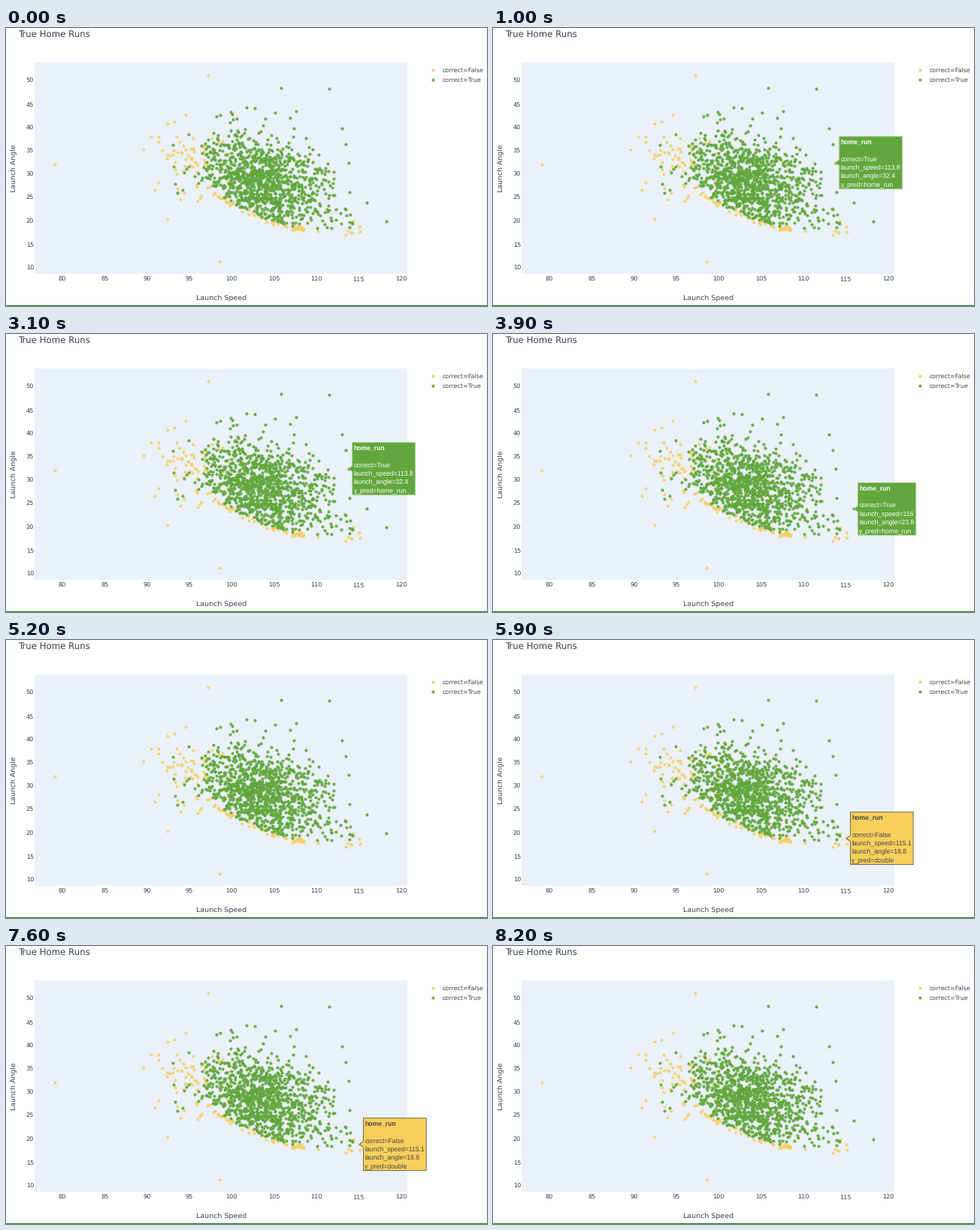
Animation of 640x371 px, one loop 8300 ms. Source, as a matplotlib script:

```python
import numpy as np
import matplotlib.pyplot as plt
from matplotlib.animation import FuncAnimation
from matplotlib.patches import Polygon, Rectangle

W, H, DPI = 640, 371, 100
STEP, FRAMES = 100, 83
GREEN, YELLOW = "#62a73d", "#f5d06b"
INK = "#38404c"

plt.rcParams["text.hinting"] = "no_hinting"

# Isolated points as (speed, angle)
GREEN_KEYS = [(105.8, 48.4), (111.5, 48.3), (113, 39.8), (113.5, 36.3),
              (113.8, 32.4), (116, 23.8), (118.3, 19.8), (101.8, 44.2)]
YELLOW_KEYS = [(79.1, 32), (97.2, 51.2), (89.6, 35.2), (98.6, 11.2),
               (94.6, 42.7), (92.4, 20.3), (90.9, 26.6), (115.1, 18.8)]


def to_px(points):
    """Map (speed, angle) pairs to stage pixels."""
    speed, angle = np.array(points, float).T
    return np.column_stack([75 + (speed - 80) * 11.26, 70 + (50 - angle) * 6.24])


def lower_edge(x):
    return 268 - 68 * ((440 - x) / 185) ** 2.4


def upper_edge(x):
    return 126 + 72 * (np.abs(x - 335) / 105) ** 3


def box(rng, count, left, right, top, bottom):
    return rng.uniform((left, top), (right, bottom), (count, 2))


def green_cloud(rng, count=1060):
    x = rng.normal(339, 45, 6000)
    y = rng.normal(207 + 0.27 * (x - 339), 31)
    keep = (x > 258) & (x < 439) & (y < lower_edge(x)) & (y > upper_edge(x))
    core = np.column_stack([x, y])[keep][:count]
    top = box(rng, 12, 278, 396, 105, 131)
    left = box(rng, 12, 221, 260, 142, 222)
    right = box(rng, 14, 428, 467, 212, 268)
    return np.vstack([core, top, left, right])


def yellow_cloud(rng):
    x = rng.uniform(268, 400, 50)
    rim = np.column_stack([x, lower_edge(x) + rng.normal(1, 2.5, x.size)])
    clump = rng.normal((392, 267), (5, 1.6), (12, 2))
    left = rng.normal((240, 168), (22, 18), (46, 2))
    low = box(rng, 8, 214, 265, 205, 235)
    inner = box(rng, 14, 262, 300, 145, 225)
    right = box(rng, 7, 410, 472, 257, 276)
    return np.vstack([rim, clump, left, low, inner, right])


fig = plt.figure(figsize=(W / DPI, H / DPI), dpi=DPI, facecolor="white")
ax = fig.add_axes([0, 0, 1, 1])
ax.set_xlim(0, W)
ax.set_ylim(H, 0)
ax.axis("off")


def label(x, y, text, size, color=INK, font="DejaVu Sans", **kw):
    return ax.text(x, y, text, fontsize=size * 72 / DPI, color=color,
                   family=font, va="baseline", **kw)


def dots(points, color, z):
    x, y = np.array(points).T
    ax.scatter(x, y, s=9, color=color, alpha=0.93, linewidths=0,
               zorder=z, snap=False)


def draw_chart():
    ax.add_patch(Rectangle((38, 46), 496, 282, color="#ebf1fb", lw=0))
    for x, speed in zip(to_px([(v, 0) for v in range(80, 121, 5)])[:, 0],
                        range(80, 121, 5)):
        label(x, 337.5, str(speed), 8.2, ha="center")
    for y, angle in zip(to_px([(0, v) for v in range(10, 51, 5)])[:, 1],
                        range(10, 51, 5)):
        label(37, y + 3.2, str(angle), 8.2, ha="right")

    label(16.5, 12, "True Home Runs", 11.7)
    label(286.3, 363.2, "Launch Speed", 9.5, ha="center")
    label(12.7, 187.3, "Launch Angle", 9.4, ha="center", rotation=90,
          rotation_mode="anchor")

    rng = np.random.default_rng(12)
    dots(np.vstack([to_px(YELLOW_KEYS), yellow_cloud(rng)]), YELLOW, 3)
    dots(np.vstack([to_px(GREEN_KEYS), green_cloud(rng)]), GREEN, 4)

    for y, color, name in [(56, YELLOW, "False"), (68.8, GREEN, "True")]:
        dots([(567.5, y)], color, 4)
        label(581, y + 3.1, "correct=" + name, 7.98)
    ax.add_patch(Rectangle((0, 370), W, 1, color="#128012", lw=0))


def tooltip(correct, speed, angle, pred):
    """Hover box to the right of a point; returns its artists."""
    fill, ink, edge = ((GREEN, "white", "#a3cb8c") if correct
                       else ("#f8cf5c", "#444444", "#55503c"))
    x, y = to_px([(speed, angle)])[0]
    left, top, bottom = x + 5.2, y - 35, y + 35
    lines = ["home_run", "", f"correct={correct}", f"launch_speed={speed}",
             f"launch_angle={angle}", f"y_pred={pred}"]
    texts = [label(left + 1.9, top + 10 + 11.45 * i, line, 8.7, ink,
                   "Liberation Sans", zorder=7,
                   weight="normal" if i else "bold")
             for i, line in enumerate(lines)]
    right = left + 4 + max(t.get_window_extent().width for t in texts)
    shape = [(x, y), (left, y - 4), (left, top), (right, top),
             (right, bottom), (left, bottom), (left, y + 4)]
    bubble = Polygon(shape, facecolor=fill, edgecolor=edge, lw=0.6, zorder=6)
    return [ax.add_patch(bubble), *texts]


draw_chart()
# (start ms, end ms, artists)
hovers = [
    (500, 3200, tooltip(True, 113.8, 32.4, "home_run")),
    (3200, 4800, tooltip(True, 116, 23.8, "home_run")),
    (5700, 7900, tooltip(False, 115.1, 18.8, "double")),
]


def update(frame):
    now = frame * STEP
    for start, end, parts in hovers:
        for part in parts:
            part.set_visible(start <= now < end)
    return []


anim = FuncAnimation(fig, update, frames=FRAMES, interval=STEP,
                     repeat=True, repeat_delay=0, blit=False)
plt.show()
```
